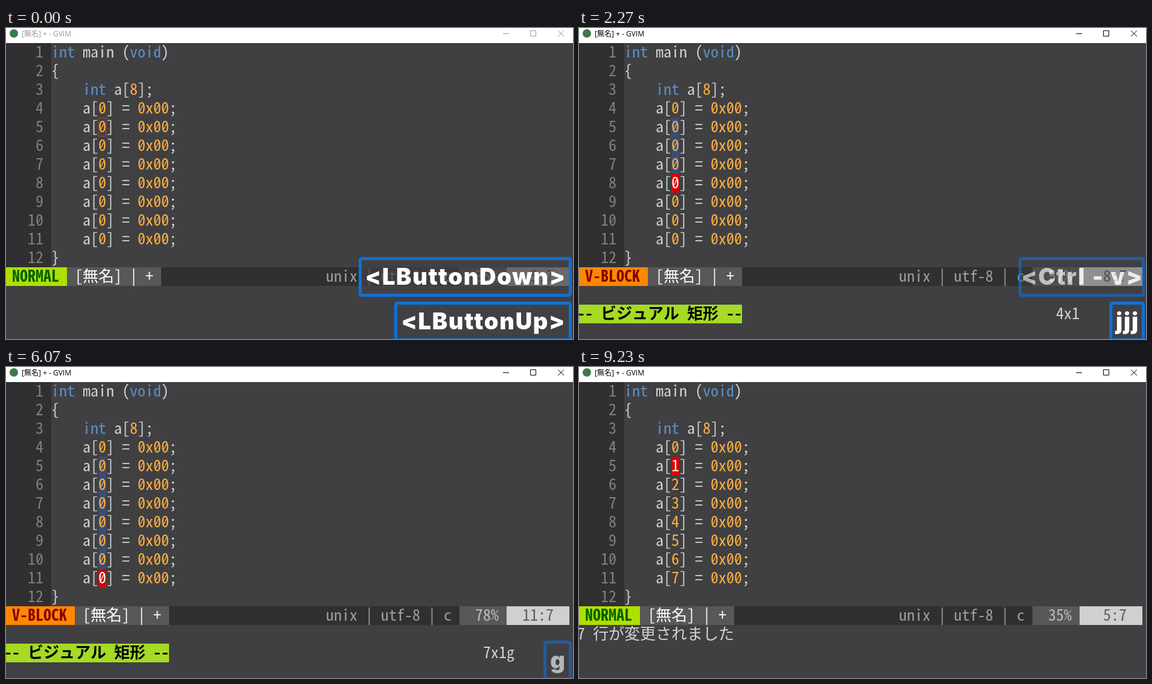
An HTML page for the animation above (9.3 s loop, 939 by 516 pixels).

```html
<!DOCTYPE html>
<html lang="ja">
<head>
<meta charset="utf-8">
<title>Block increment</title>
<style>
html, body { margin: 0; width: 100%; height: 100%; overflow: hidden; background: #404042; }
svg { display: block; }
.mono { font-family: "Noto Sans Mono CJK JP", "Noto Sans Mono", monospace; }
.wide { font: 26px "Noto Sans CJK JP", "Noto Sans Mono CJK JP", sans-serif; }
.bold { font-weight: 700; }
.title { font: 12px "Open Sans", "Noto Sans CJK JP", sans-serif; }
.key { font: 900 38px Inter, "DejaVu Sans", sans-serif; letter-spacing: 1.7px; word-spacing: 1.5px; }
</style>
</head>
<body>
<svg id="stage" width="939" height="516" viewBox="0 0 939 516"></svg>
<script>
const LOOP = 9300, CELL = 13, ROW = 31, LEFT = -3, TOP = 25;
const FG = '#d2d2d0', BLUE = '#5b8fc7', ORANGE = '#ffb043', RED = '#d90000';
const stage = document.getElementById('stage');

// Latin glyphs must fill exactly one cell, whichever mono face is present
const pen = document.createElement('canvas').getContext('2d');
pen.font = '26px "Noto Sans Mono CJK JP", "Noto Sans Mono", monospace';
const SIZE = Math.min(26, 26 * CELL / pen.measureText('0').width);

const colX = c => LEFT + c * CELL;
const rowY = r => TOP + (r - 1) * ROW;
const esc = s => s.replace(/</g, '&lt;').replace(/>/g, '&gt;');
const rect = (x, y, w, h, fill, more = '') =>
  `<rect x="${x}" y="${y}" width="${w}" height="${h}" fill="${fill}" ${more}/>`;
const cells = (row, col, n, fill) => rect(colX(col), rowY(row), n * CELL, ROW, fill);

// Zeros carry a diagonal bar
const slash = (row, col, color) =>
  `<path d="M${colX(col) + 4.2} ${rowY(row) + 19}l4.6 -9.5" stroke="${color}" stroke-width="1.4"/>`;

// Writes a string on the character grid; wide characters take two cells
function put(row, col, str, fill, bold = '') {
  let out = '';
  for (const [part] of str.matchAll(/[\u2e80-\uffff]+|[!-~]+|\s+/g)) {
    const wide = part > '\u2e80', step = wide ? 2 : 1;
    if (part.trim()) {
      const xs = [...part].map((_, i) => colX(col + i * step)).join(' ');
      const face = wide ? 'class="wide ' : `font-size="${SIZE}" class="mono `;
      out += `<text x="${xs}" y="${rowY(row) + 24}" fill="${fill}" ${face}${bold}">${esc(part)}</text>`;
      for (const zero of part.matchAll(/0/g)) out += slash(row, col + zero.index, fill);
    }
    col += part.length * step;
  }
  return out;
}

function codeLine(row, str) {
  let col = 6, out = '';
  str.split(/(\bint\b|\bvoid\b|0x00|\d)/).forEach((part, i) => {
    out += put(row, col, part, i % 2 ? (/\d/.test(part) ? ORANGE : BLUE) : FG);
    col += part.length;
  });
  return out;
}

function titleBar(active) {
  const ink = active ? '#000' : '#999';
  return rect(0, 0, 939, 25, '#fff') +
    '<circle cx="13" cy="9" r="7" fill="#3d7a48"/>' +
    `<text class="title" x="26" y="14" fill="${ink}">[無名] + - GVIM</text>` +
    `<path d="M823 9.5h10M868.5 4.5h9v9h-9zM914 4.5l10 9.5M924 4.5l-10 9.5" fill="none" stroke="${ink}"/>`;
}

function statusLine(visual, row) {
  const name = visual ? 'V-BLOCK' : 'NORMAL', n = name.length + 2;
  const place = row + ':7';
  return cells(13, 0, 72, '#303030') +
    cells(13, 0, n, visual ? '#ff8700' : '#afdf00') +
    put(13, 1, name, visual ? '#870000' : '#005f00', 'bold') +
    cells(13, n, 12, '#585858') + put(13, n + 1, '[無名] | +', '#fff') +
    put(13, 41, 'unix | utf-8 | c', '#9e9e9e') +
    cells(13, 58, 6, '#585858') + put(13, 60, Math.floor(row * 100 / 14) + '%', '#bcbcbc') +
    cells(13, 64, 8, '#d0d0d0') + put(13, 70 - place.length, place, '#606060');
}

function popup(str, left, y, opacity) {
  if (opacity <= 0) return '';
  return `<g opacity="${opacity}">` +
    rect(left + 2.5, y + 2.5, 932 - left, 61, '#424244',
      'fill-opacity=".72" stroke="#1070d6" stroke-width="5" rx="2.5"') +
    `<text class="key" x="${(left + 937) / 2 + 0.8}" y="${y + 46}" text-anchor="middle" fill="#fff">${esc(str)}</text></g>`;
}

// Opacity after each of five times
const FADE = [0.85, 0.62, 0.4, 0.2, 0];
const fade = (t, times) => times.reduce((o, at, i) => t >= at ? FADE[i] : o, 1);

// Number of listed times already passed
const passed = (t, times) => times.filter(at => t >= at).length;

const VISUAL = 980, DONE = 6930;
const UPPER = 380, LOWER = 454;
const MOVES = [1600, 1780, 2040, 2310, 2580, 2910];
const TYPED = [1510, 1780, 2040, 2310, 2580, 2910];
const BLINKS = [380, 580, 3680, 3940, 4360, 4560, 5540, 5800, 6210, 6450,
  7660, 7860, 8270, 8590, 8960, 9230];

function popups(t) {
  const js = passed(t, TYPED);
  let out = '';
  if (t < 70) out += popup('<LButtonDown>', 584, UPPER, 1) + popup('<LButtonUp>', 643, LOWER, 1);
  else if (t >= 850 && t < VISUAL) out += popup('<Ctrl>', 791, LOWER, 1);
  else if (t >= VISUAL && t < 2500)
    out += popup('<Ctrl - v>', 728, js ? UPPER : LOWER, fade(t, [2180, 2260, 2340, 2420, 2500]));
  if (js && t < 4410)
    out += popup('j'.repeat(js), 916.8 - 12.8 * js, LOWER, fade(t, [4140, 4240, 4300, 4360, 4410]));
  if (t >= 4810 && t < 6330)
    out += popup('g', 890, LOWER, fade(t, [6070, 6070, 6170, 6250, 6330]));
  if (t >= 6560 && t < 6800) out += popup('<Ctrl>', 791, LOWER, 1);
  if (t >= 6800)
    out += popup('<Ctrl - a>', 726, LOWER, fade(t, [8130, 8200, 8270, 8330, 8400]));
  return out;
}

function scene(t) {
  const visual = t >= VISUAL && t < DONE, done = t >= DONE;
  const row = done ? 5 : 5 + passed(t, MOVES);
  const index = r => done ? r - 4 : 0;
  const x = colX(12);
  let out = rect(0, 0, 939, 516, '#404042') + rect(0, 25, 75, 372, '#303032') + titleBar(t >= 70);

  if (visual) out += rect(x, rowY(5), CELL, (row - 5) * ROW, '#3a4d74');
  for (let r = 1; r <= 12; r++) {
    out += put(r, r < 10 ? 4 : 3, String(r), '#857f78');
    const line = ['int main (void)', '{', '    int a[8];'][r - 1];
    out += codeLine(r, line || (r === 12 ? '}' : `    a[${index(r)}] = 0x00;`));
  }

  if (t < 70) {
    out += rect(x + 0.5, rowY(row) + 0.5, CELL - 1, ROW - 1, 'none', 'stroke="#a05030"');
  } else if (passed(t, BLINKS) % 2 === 0) {
    out += cells(row, 12, 1, RED) + put(row, 12, String(index(row)), '#fff');
  }

  out += statusLine(visual, row);
  if (visual) {
    const size = row - 4 + 'x1';
    out += cells(15, 0, 21, '#a5da25') + put(15, 0, '-- ビジュアル 矩形 --', '#000', 'bold');
    out += put(15, 61, t < 4810 ? size : t < 5870 ? 'g' : size + 'g', FG);
  }
  if (done) out += put(14, 0, '7 行が変更されました', FG);
  return out + popups(t);
}

let last = '';
function draw(now) {
  const next = scene(now % LOOP);
  if (next !== last) stage.innerHTML = last = next;
  requestAnimationFrame(draw);
}
draw(0);
</script>
</body>
</html>
```
